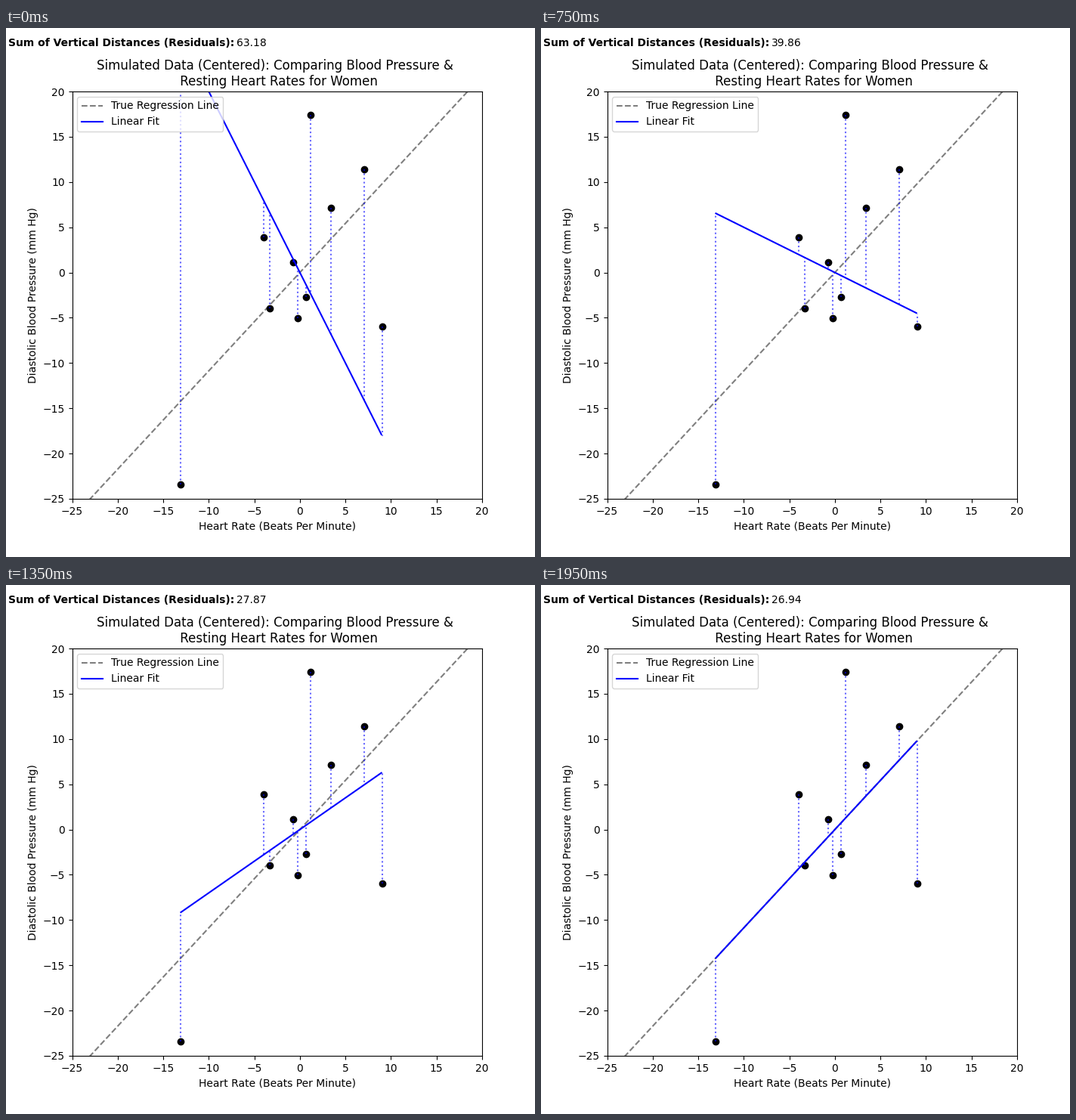
Write a matplotlib script that moves like this. It is 700 by 700 pixels and loops after 2500 ms.

```python
import matplotlib.pyplot as plt
import numpy as np
from matplotlib.animation import FuncAnimation

FRAMES, STEP_MS = 50, 50
SWEEP = 39  # trial slopes shown before the best fit is held

# Ten centered readings: heart rate, blood pressure
points = [(-13.06, -23.38), (-3.97, 3.89), (-3.31, -3.96), (-0.74, 1.13),
          (-0.24, -5.05), (0.67, -2.71), (1.17, 17.39), (3.41, 7.14),
          (7.05, 11.39), (9.05, -5.97)]
x, y = np.transpose(points)
best = (x @ y) / (x @ x)
grid = np.arange(x.min(), x.max())

fig, ax = plt.subplots(figsize=(7, 7), dpi=100)
ax.set(xlim=(-25, 20), ylim=(-25, 20),
       xlabel="Heart Rate (Beats Per Minute)",
       ylabel="Diastolic Blood Pressure (mm Hg)")
ax.set_title("Simulated Data (Centered): Comparing Blood Pressure & \n"
             " Resting Heart Rates for Women")

ax.scatter(x, y, color="black")
span = np.array([-25, 20])
ax.plot(span, best * span, "k--", alpha=0.5, label="True Regression Line")
fit, = ax.plot([], [], "b-", label="Linear Fit")
gaps = [ax.plot([], [], "b:", alpha=0.6)[0] for _ in points]
ax.legend(loc="upper left")

ax.text(-32, 25, "Sum of Vertical Distances (Residuals):", weight="bold")
total = ax.text(-7, 25, "")


def update(i):
    slope = -2 + 0.1 * i if i < SWEEP else best
    fit.set_data(grid, slope * grid)
    for gap, (px, py) in zip(gaps, points):
        gap.set_data([px, px], [py, slope * px])
    total.set_text(f"{np.linalg.norm(y - slope * x):.2f}")
    return [fit, total, *gaps]


anim = FuncAnimation(fig, update, frames=FRAMES, interval=STEP_MS,
                     init_func=lambda: update(0), repeat=True)
plt.show()
```
